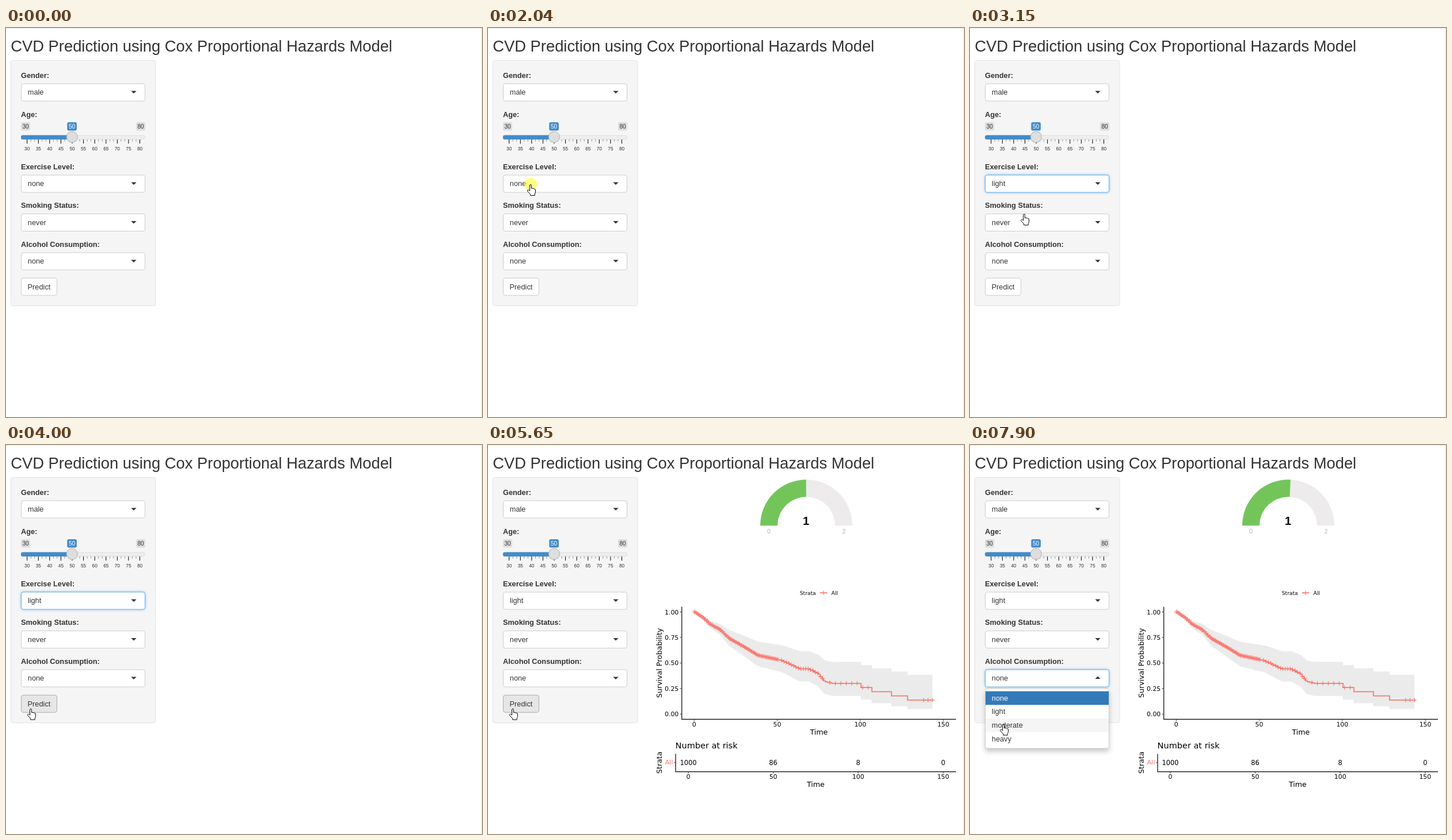
These frames come from a looping animation (827 px wide and 677 px high, 8000 ms). An HTML page:

```html
<!DOCTYPE html>
<html lang="en">
<head>
<meta charset="utf-8">
<title>CVD Prediction</title>
<style>
html, body { margin: 0; width: 100%; height: 100%; overflow: hidden; background: #fff; }
svg { display: block; width: 100%; height: 100%; font-family: "Liberation Sans", Arial, sans-serif; font-size: 12.78px; fill: #333; }
.plot { font-family: "DejaVu Sans", sans-serif; fill: #000; }
.gauge { font-family: "Liberation Sans", Arial, sans-serif; }
.mid { text-anchor: middle; }
.end { text-anchor: end; }
</style>
</head>
<body>
<svg id="stage" viewBox="0 0 827 677"></svg>
<script>
const LOOP = 8000;
const RED = '#f8766d';
const $ = id => document.getElementById(id);
const range = (n, f) => Array.from({ length: n }, (_, i) => f(i));
const repeat = (n, f) => range(n, f).join('');
const lerp = (a, b, k) => a + (b - a) * k;
const clamp = k => Math.min(1, Math.max(0, k));

const text = (x, y, s, attrs = '') => `<text x="${x}" y="${y}" ${attrs}>${s}</text>`;
const centered = (x, y, s, size, attrs = '') => text(x, y, s, `class="mid" font-size="${size}" ${attrs}`);
const upright = (x, y, s) => centered(0, 0, s, 12.6, `transform="translate(${x} ${y}) rotate(-90)"`);
const rect = (x, y, w, h, fill, attrs = '') =>
  `<rect x="${x}" y="${y}" width="${w}" height="${h}" fill="${fill}" ${attrs}/>`;
const line = (d, color, width = 1) => `<path d="${d}" fill="none" stroke="${color}" stroke-width="${width}"/>`;
const label = (y, s) => text(26, y, s, 'font-weight="bold"');

// ---- form ----
const SELECTS = { gender: 97, exercise: 256, smoking: 323.5, alcohol: 391 };

const select = (name, title, value) => {
  const y = SELECTS[name];
  return label(y - 10.2, title) +
    rect(26.5, y, 215, 30, '#66afe9', `id="${name}Glow" rx="4" filter="url(#glow)" visibility="hidden"`) +
    rect(26.5, y, 215, 30, '#fff', `id="${name}Box" rx="3.6" stroke="#ccc"`) +
    text(37.8, y + 19.3, value, `id="${name}Value"`) +
    `<path id="${name}Arrow" d="M-4.6 -2.3H4.6L0 2.3Z" transform="translate(222 ${y + 14.8})"/>`;
};

function slider() {
  const x0 = 36.7, gap = 19.58;
  const badge = (x, w, s, bg, fg) =>
    rect(x, 164, w, 14.6, bg, 'rx="2.8"') + centered(x + w / 2, 174.8, s, 10.1, `fill="${fg}"`);
  return label(154.5, 'Age:') +
    badge(26, 16, 30, '#ddd', '#333') + badge(226, 16, 80, '#ddd', '#333') +
    badge(106.3, 16.6, 50, '#428bca', '#fff') +
    rect(26.5, 187, 215, 6.6, '#eee', 'rx="3.3" stroke="#d8d8d8" stroke-width=".8"') +
    rect(26, 186.6, 89, 7.4, '#428bca', 'rx="3"') +
    repeat(31, i => {
      const x = x0 + i * gap / 3;
      return i % 3 ? line(`M${x} 194v3.6`, '#888', .9) : line(`M${x} 194v7.2`, '#000');
    }) +
    repeat(11, i => centered(x0 + i * gap, 213, 30 + 5 * i, 8.3)) +
    '<circle cx="114.8" cy="189.6" r="9.6" fill="#dedede" stroke="#ababab" stroke-width=".9"/>';
}

const OPTIONS = ['none', 'light', 'moderate', 'heavy'];
const ROW = 23.7, LIST = 37.6;
const menu = () => `<g id="menu">
  ${rect(26.5, 33, 215, 104, '#000', 'rx="3.6" filter="url(#shadow)" opacity=".22"')}
  ${rect(26.5, 33, 215, 104, '#fff', 'rx="3.6" stroke="#ccc"')}
  ${rect(27, LIST, 214, ROW, '#337ab7')}
  ${rect(27, LIST, 214, ROW, '#f5f5f5', 'id="hover"')}
  ${OPTIONS.map((s, i) => text(37.8, LIST + ROW * i + 16, s, i ? '' : 'fill="#fff"')).join('')}</g>`;

// ---- survival plot ----
const X0 = 358, Y0 = 468.3, UNIT = 177.8;
const BENDS = [[X0, 290.5], [372, 300], [386, 312.5], [402, 321], [418, 336.5], [447, 353], [468, 366],
  [510, 375], [541, 389.5], [556, 389.5], [573, 398], [584, 411.5], [598, 414.8]];
const DROPS = [648, 667, 701, 729];

// Small stairs along the bends, then a few equal drops.
function height(x) {
  const drops = DROPS.filter(d => x >= d).length;
  const q = X0 + Math.floor((x - X0) / 3) * 3;
  const i = BENDS.findIndex(p => p[0] > q);
  if (i < 0) return 414.8 + 7.25 * drops;
  const [a, b] = [BENDS[i - 1], BENDS[i]];
  return lerp(a[1], b[1], (q - a[0]) / (b[0] - a[0]));
}

// Confidence limit: the error of log survival grows with the hazard.
function limit(x, side) {
  const hazard = -Math.log((Y0 - height(x)) / UNIT);
  return Y0 - UNIT * Math.exp(-hazard + side * hazard * (.32 + .1 * hazard));
}

const stairs = (end, f) => range(end - X0 + 1, i => `H${X0 + i}V${f(X0 + i).toFixed(1)}`);
const cross = x => `M${x - 3.7} ${height(x)}h7.4m-3.7 -3.7v7.4`;
const crosses = (from, to, gap) => repeat(Math.floor((to - from) / gap) + 1, i => cross(from + i * gap));

function ribbon() {
  const lower = range(415, i => [772 - i, limit(772 - i, -1).toFixed(1)]);
  return `<path d="M${X0} 290.5${stairs(772, x => limit(x, 1)).join('')}L${lower.join('L')}Z" fill="#ebebeb"/>`;
}

function timeAxis(x0, step, y) {
  return repeat(4, i => line(`M${x0 + i * step} ${y}v3`, '#333') + centered(x0 + i * step, y + 12.6, i * 50, 10.9));
}

function gaugeArc(deg) {
  const a = deg * Math.PI / 180, cx = 553, cy = 140.3;
  const at = r => `${cx - r * Math.cos(a)} ${cy - r * Math.sin(a)}`;
  return `M${cx - 80} ${cy}A80 80 0 0 1 ${at(80)}L${at(50)}A50 50 0 0 0 ${cx - 50} ${cy}Z`;
}

const gauge = () => `<g class="gauge">
  <path d="${gaugeArc(180)}" fill="#edebeb"/><path id="arc" fill="#73c55a"/>
  ${centered(552.6, 139, 1, 20, 'id="score" font-weight="bold"')}
  ${centered(488, 153.7, 0, 10.5, 'fill="#b3b3b3"')}
  ${centered(618.3, 153.7, 2, 10.5, 'fill="#b3b3b3"')}</g>`;

const plot = () => `<g id="results" class="plot">
  ${gauge()}
  ${text(541.8, 260.5, 'Strata', 'font-size="9.1"')}
  ${line('M576.5 257.3h13', RED, 1.7)}${line('M583 253.5v7.6', RED, 1.1)}
  ${text(596.6, 260.5, 'All', 'font-size="9.1"')}
  ${ribbon()}
  ${line(`M${X0} 290.5` + stairs(774, height).join(''), '#f37d75', 1.8)}
  ${line(crosses(X0, 505, 1.8) + crosses(510, 585, 4.2) + crosses(594, 662, 9.5) + crosses(757, 772, 7.5), RED, 1.1)}
  ${line('M336.7 281.5V477.3H813', '#000', 1.2)}
  ${repeat(5, i => line(`M333.5 ${Y0 - i * UNIT / 4}h3`, '#333') +
    text(331.3, Y0 + 4 - i * UNIT / 4, (i / 4).toFixed(2), 'class="end" font-size="10.9"'))}
  ${timeAxis(358.2, 144.3, 477.5)}
  ${centered(574.8, 504, 'Time', 12.6)}
  ${upright(302, 379.3, 'Survival Probability')}
  ${text(325.6, 528.3, 'Number at risk', 'font-size="14.5"')}
  ${line('M326 537.5V568.6H813', '#000', 1.2)}${line('M323 552.8h3', '#333')}
  ${upright(302, 552.8, 'Strata')}
  ${text(321.3, 556, 'All', `class="end" font-size="11.2" fill="${RED}"`)}
  ${[1000, 86, 8, 0].map((n, i) => centered(348 + i * 147.6, 557, n, 11.4)).join('')}
  ${timeAxis(348, 147.6, 568.6)}
  ${centered(569.3, 595.3, 'Time', 12.6)}</g>`;

// ---- scene ----
const HAND = 'M-1.4 11.5V2a1.4 1.4 0 0 1 2.8 0V7q1.9 -.9 2.7 .5q1.8 -.6 2.4 .7q2 -.4 2 1.6V13' +
  'q0 2 -1.3 4v2.5H-.3V17.5L-5.2 12.2Q-6 10.6 -4.8 10q1.3 -.5 2.4 .7Z';
const ARROW = 'M0 0V16L3.7 12.5L6.2 18.3L8.7 17.2L6.2 11.6H11.3Z';

$('stage').innerHTML = `
  <defs>
    <filter id="glow" x="-10%" y="-50%" width="120%" height="200%"><feGaussianBlur stdDeviation="2.8"/></filter>
    <filter id="shadow" x="-10%" y="-20%" width="120%" height="150%"><feOffset dy="5.5"/><feGaussianBlur stdDeviation="5"/></filter>
  </defs>
  ${rect(0, 0, 827, 677, '#fff')}
  ${line('M0 .5H826.5V677', '#e4e4e4')}
  ${text(8.2, 41, 'CVD Prediction using Cox Proportional Hazards Model', 'font-size="27.37"')}
  ${rect(8.5, 56.5, 251.5, 427, '#f5f5f5', 'rx="3.6" stroke="#e3e3e3"')}
  ${select('gender', 'Gender:', 'male')}
  ${slider()}
  ${select('exercise', 'Exercise Level:', 'none')}
  ${select('smoking', 'Smoking Status:', 'never')}
  ${select('alcohol', 'Alcohol Consumption:', 'none')}
  ${rect(26.5, 435.3, 62, 30, '#fff', 'id="button" rx="3.6" stroke="#ccc"')}
  ${text(37.6, 454.6, 'Predict')}
  ${plot()}
  ${menu()}
  <g id="cursor"><circle id="click" r="11" fill="#ff0" opacity=".5"/>
    <path id="pointer" fill="#fff" stroke="#000" stroke-linejoin="round"/></g>`;

// ---- motion ----
// Pointer moves: begin, end, x, y
const MOVES = [[110, 740, 72, 113], [1030, 1610, 57, 285], [1760, 2040, 74, 272], [2200, 2520, 60, 266],
  [2570, 2620, 60, 319], [2820, 2910, 60, 326], [3050, 3150, 94, 323.5], [3480, 4000, 43, 458.5],
  [6930, 7110, 84, 406], [7630, 7900, 58, 485.5]];
const CLICKS = [[2040, 2200], [3050, 3120], [4250, 4400], [7260, 7400]];

const within = (t, a, b) => t >= a && t < b;
const show = (id, on) => $(id).setAttribute('visibility', on ? 'visible' : 'hidden');

function pointerAt(t) {
  return MOVES.reduce(([x, y], [begin, end, toX, toY]) => {
    const k = clamp((t - begin) / (end - begin)), e = k * k * (3 - 2 * k);
    return [lerp(x, toX, e), lerp(y, toY, e)];
  }, [772, 664]);
}

function setSelect(name, focused, open) {
  show(name + 'Glow', focused);
  $(name + 'Box').setAttribute('stroke', focused ? '#66afe9' : '#ccc');
  $(name + 'Arrow').setAttribute('transform',
    `translate(222 ${SELECTS[name] + (open ? 13.8 : 14.8)}) scale(1 ${open ? -1 : 1})`);
}

function draw(t) {
  const [x, y] = pointerAt(t);
  const exerciseOpen = within(t, 2100, 3100), alcoholOpen = t >= 7310;
  const open = exerciseOpen || alcoholOpen;
  const menuY = exerciseOpen ? SELECTS.exercise : SELECTS.alcohol;

  setSelect('exercise', within(t, 2100, 4300), exerciseOpen);
  setSelect('alcohol', alcoholOpen, alcoholOpen);
  $('exerciseValue').textContent = t < 3100 ? 'none' : 'light';

  const row = Math.floor((y - menuY - LIST) / ROW);
  show('menu', open);
  $('menu').setAttribute('transform', `translate(0 ${menuY})`);
  show('hover', open && row > 0 && row < OPTIONS.length);
  $('hover').setAttribute('y', LIST + row * ROW);

  const overButton = within(x, 26, 89) && within(y, 435, 466) && !open;
  const pressed = overButton || within(t, 4250, 7310);
  $('button').setAttribute('fill', pressed ? '#e6e6e6' : '#fff');
  $('button').setAttribute('stroke', pressed ? '#adadad' : '#ccc');

  const overField = within(x, 26, 242) && (Object.values(SELECTS).some(s => within(y, s - .5, s + 30.5)) ||
    open && within(y, menuY, menuY + 137));
  show('cursor', t >= 110);
  $('cursor').setAttribute('transform', `translate(${x} ${y})`);
  $('pointer').setAttribute('d', overButton || overField ? HAND : ARROW);
  show('click', CLICKS.some(c => within(t, ...c)));

  const grow = clamp((t - 4998) / 700) ** .48;
  show('results', t >= 5050);
  $('arc').setAttribute('d', gaugeArc(92.8 * grow));
  $('score').setAttribute('fill-opacity', grow);
}

const start = performance.now();
function tick() {
  draw((performance.now() - start) % LOOP);
  requestAnimationFrame(tick);
}
tick();
</script>
</body>
</html>
```
